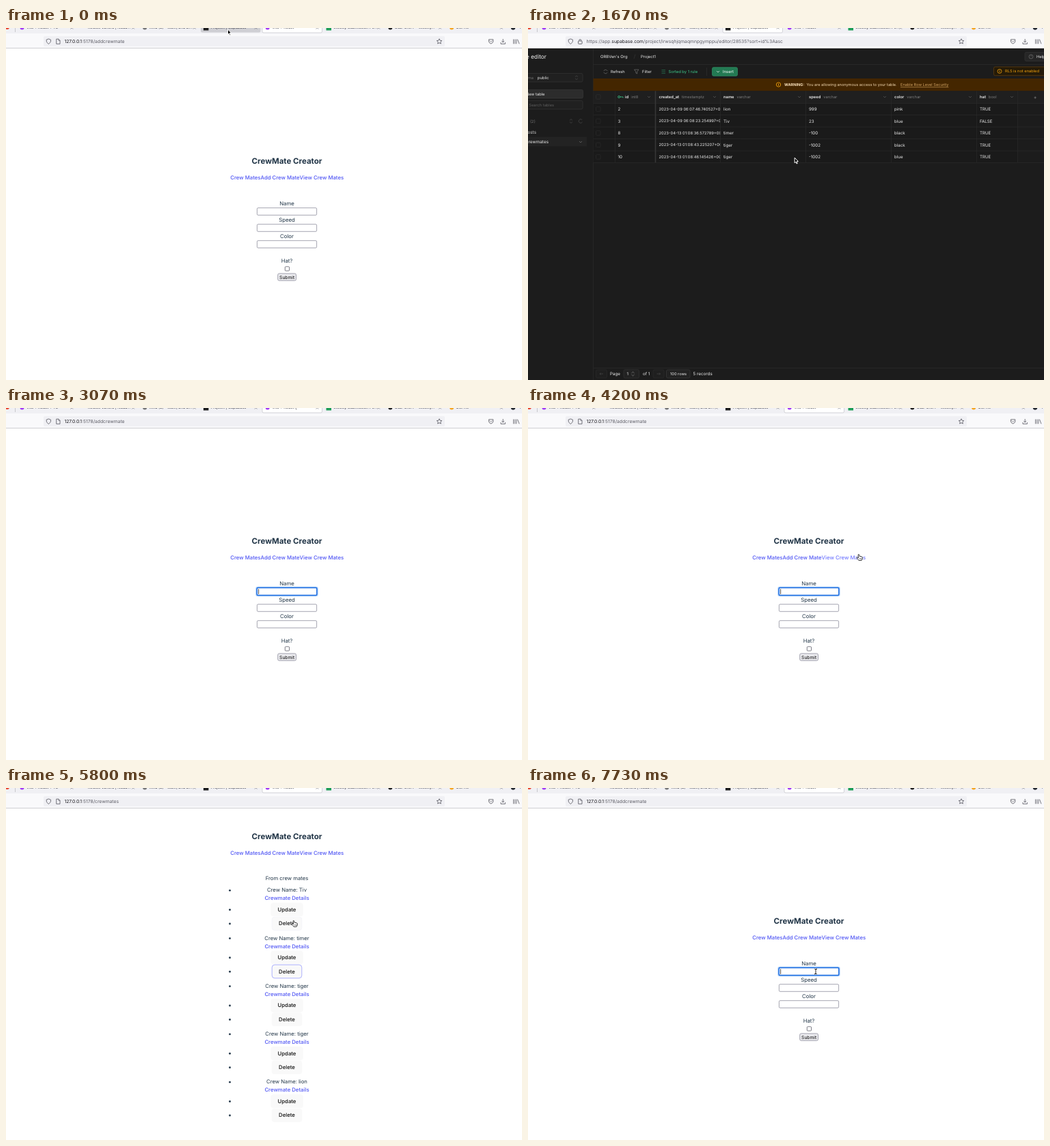
An HTML page with a canvas that plays this animation: 755 px wide and 516 px high, repeating every 8000 ms.

```html
<!DOCTYPE html>
<html lang="en">
<head>
<meta charset="utf-8">
<title>Crew form</title>
<style>
html, body { margin: 0; width: 755px; height: 516px; overflow: hidden; background: #fff; }
canvas { display: block; }
</style>
</head>
<body>
<canvas id="stage" width="755" height="516"></canvas>
<script>
const g = document.getElementById('stage').getContext('2d');
const LOOP = 8000;
const INK = '#213547', LINK = '#5056f4', LINK_HOVER = '#747bff';

// ---- drawing helpers ----
function text(s, x, y, size, color, weight = 400, align = 'left') {
  g.font = `${weight} ${size}px Inter, sans-serif`;
  g.fillStyle = color;
  g.textAlign = align;
  g.fillText(s, x, y + size * 0.36);
  return x + g.measureText(s).width;
}
function rect(x, y, w, h, fill) {
  g.fillStyle = fill;
  g.fillRect(x, y, w, h);
}
function box(x, y, w, h, r, fill, stroke, lw = 1) {
  g.beginPath();
  g.roundRect(x, y, w, h, r);
  if (fill) { g.fillStyle = fill; g.fill(); }
  if (stroke) { g.strokeStyle = stroke; g.lineWidth = lw; g.stroke(); }
}
function dot(x, y, r, fill) {
  g.beginPath();
  g.arc(x, y, r, 0, 7);
  g.fillStyle = fill;
  g.fill();
}
function line(points, color, lw = 0.8, fill) {
  g.beginPath();
  for (let i = 0; i < points.length; i += 2) g.lineTo(points[i], points[i + 1]);
  if (fill) { g.closePath(); g.fillStyle = fill; g.fill(); }
  g.strokeStyle = color;
  g.lineWidth = lw;
  g.stroke();
}
function ring(x, y, r, color, lw = 0.8, from = 0, to = 7) {
  g.beginPath();
  g.arc(x, y, r, from, to);
  g.strokeStyle = color;
  g.lineWidth = lw;
  g.stroke();
}
const chevron = (x, y, c, d = 1) => line([x - 2, y - d, x, y + d, x + 2, y - d], c, 0.7);
const sorter = (x, y, c) => { chevron(x, y - 2, c, -0.9); chevron(x, y + 2, c, 0.9); };
const clamp = v => Math.max(0, Math.min(1, v));

// ---- browser frame ----
const TABS = ['Vite + React + TS', 'Routes Vanora | Nudd…', 'Kind (2) - Main, and Br…', 'Project1 | Supabase',
  'Vite + React', 'Weekly Submission Po…', 'Cuz: Unit 7 - Weekly…', 'Get Hit'];
const TAB_ICONS = ['#a33cf5', '', '#777', '#1c1c1c', '#a33cf5', '#1e9e57', '#222', '#f5a623'];

function drawBrowser(url, active, hover) {
  rect(0, 0, 755, 9, '#f0f0f4');
  rect(0, 8, 755, 22, '#f9f9fb');
  rect(0, 29, 755, 1, '#cfcfd3');
  dot(2, -1, 3, '#e8442e');
  rect(13, 0, 0.7, 6, '#b5b5bb');
  if (hover >= 0) box(285 + (hover - 3) * 90, -6, 87.5, 12.5, 2, '#cfcfd4');
  box(285 + (active - 3) * 90, -6, 87.5, 13, 2, '#fff', '#c4c4ca', 0.7);
  TABS.forEach((name, i) => {
    const x = 20 + i * 89.8;
    const color = TAB_ICONS[i];
    if (i === 3 || i === 5) rect(x - 0.5, -4, 7.5, 7.5, color);
    else if (color) dot(x + 3.5, -0.5, 3, color);
    text(name, x + 10, -0.6, 5.6, '#33333b');
    line([x + 74.5, -2, x + 78, 1.5], '#55555d', 0.6);
    line([x + 74.5, 1.5, x + 78, -2], '#55555d', 0.6);
  });
  dot(742, -0.5, 3.2, '#24292f');
  text('r', 752, -0.6, 5.6, '#33333b');

  box(55, 12, 587, 15, 2, '#f0f0f4');
  const c = '#55555d';
  line([62.3, 16, 65.5, 17.2, 65.2, 20.5, 62.3, 23.6, 59.4, 20.5, 59.1, 17.2, 62.3, 16], c);
  if (active === 3) {
    box(73.5, 19, 5.6, 4.3, 0.8, null, c, 0.9);
    ring(76.3, 18.5, 1.7, c, 0.9, Math.PI, 0);
  } else {
    line([73.7, 16.2, 77, 16.2, 79, 18.2, 79, 23.3, 73.7, 23.3, 73.7, 16.2], c);
    line([76.8, 16.2, 76.8, 18.4, 79, 18.4], c, 0.6);
  }
  let x = 85.5;
  url.forEach((part, i) => x = text(part, x, 19.8, 6.74, i === 1 ? '#15141a' : '#5b5b64'));

  const star = [];
  for (let i = 0; i <= 10; i++) {
    const a = i * Math.PI / 5 - Math.PI / 2, r = i % 2 ? 1.9 : 4;
    star.push(634 + r * Math.cos(a), 19.8 + r * Math.sin(a));
  }
  line(star, c);
  line([706.5, 16.8, 712.8, 16.8, 712.8, 20, 711.5, 22, 709.6, 23, 707.7, 22, 706.5, 20, 706.5, 16.8], c);
  chevron(709.6, 19.4, c);
  line([727.2, 16, 727.2, 21], c);
  chevron(727.2, 20, c, 1.2);
  line([724, 21, 724, 23.3, 730.4, 23.3, 730.4, 21], c);
  for (const bx of [742.5, 744.7, 746.9]) line([bx, 16.5, bx, 23.3], c);
  line([748.5, 16.7, 751, 23.3], c);
}

// ---- light pages ----
function drawHeading(y, hoverLink) {
  text('CrewMate Creator', 411, y, 11.5, INK, 700, 'center');
  const names = ['Crew Mates', 'Add Crew Mate', 'View Crew Mates'];
  g.font = '500 7.75px Inter, sans-serif';
  let x = 411 - g.measureText(names.join('')).width / 2;
  names.forEach((s, i) => x = text(s, x, y + 24.6, 7.75, i === hoverLink ? LINK_HOVER : LINK, 500));
}

function drawForm(focusedAt, t, hoverLink) {
  drawHeading(195, hoverLink);
  ['Name', 'Speed', 'Color', 'Hat?'].forEach((s, i) =>
    text(s, 411, [256.8, 280.8, 304.8, 340.8][i], 7.8, INK, 400, 'center'));
  for (const y of [263.7, 287.7, 311.7]) box(367.4, y, 87.2, 10.6, 1.5, '#fff', '#8f8f9d', 0.8);
  if (t >= focusedAt) {
    box(366, 262.4, 90, 13.2, 2.5, null, '#a9cdf8', 1.4);
    box(367.2, 263.5, 87.6, 11, 1.5, '#fff', '#1a6be0', 1.5);
    if ((t - focusedAt) % 1000 < 500) rect(369.3, 265.3, 0.8, 7.6, '#222');
  }
  box(408.3, 349.8, 6.2, 6.2, 1, '#fff', '#6f6f7a', 0.9);
  box(397.7, 359.9, 26.8, 10.4, 2, '#e9e9ed', '#8f8f9d', 0.8);
  text('Submit', 411.1, 365.2, 6.7, '#000', 400, 'center');
}

const fade = (t, on, off) => clamp((t - on) / 250) - clamp((t - off) / 250);

function drawButton(label, y, half, glow) {
  box(411 - half, y - 10, half * 2, 20, 4, '#f9f9f9');
  if (glow > 0) box(411 - half + 0.4, y - 9.8, half * 2 - 0.8, 19.6, 4, null, `rgba(100,108,255,${glow})`, 0.8);
  text(label, 411, y, 7.75, '#111', 500, 'center');
}

function drawList(t, hoverLink) {
  const loaded = t >= 4670;
  const top = loaded ? 71 : 247;
  drawHeading(top, hoverLink);
  text('From crew mates', 411, top + 61.7, 7.7, INK, 400, 'center');
  if (!loaded) return;
  ['Tiv', 'timer', 'tiger', 'tiger', 'lion'].forEach((name, i) => {
    const y = 149.7 + i * 70.25;
    text('Crew Name: ' + name, 411, y, 7.7, INK, 400, 'center');
    text('Crewmate Details', 411, y + 12, 7.75, LINK, 500, 'center');
    drawButton('Update', y + 28.5, 23.7, 0);
    const glow = i === 0 ? fade(t, 5790, 5920) : i === 1 ? fade(t, 4950, 5710) : 0;
    drawButton('Delete', y + 49, 22.2, glow);
    for (const dy of [0.5, 28.8, 49.3]) dot(327.5, y + dy, 1.4, INK);
  });
  if (t >= 6250) {
    box(-3, 504, 108, 14, 2, '#f0f0f4', '#c4c4ca', 0.7);
    text('127.0.0.1:5178/addcrewmate', 3, 510, 6.2, '#33333b');
  }
}

// ---- database page ----
const COLUMNS = [[142, 'id', 'int8', 177], [191.5, 'created_at', 'timestamptz', 273], [286, 'name', 'varchar', 397],
  [411, 'speed', 'varchar', 522], [536, 'color', 'varchar', 647], [661, 'hat', 'bool', 708]];
const ROWS = ['2|2023-04-09 06:07:46.740527+00|lion|999|pink|TRUE',
  '3|2023-04-09 06:08:23.254997+00|Tiv|23|blue|FALSE',
  '8|2023-04-13 01:08:36.572789+00|timer|-100|black|TRUE',
  '9|2023-04-13 01:08:43.225207+00|tiger|-1002|black|TRUE',
  '10|2023-04-13 01:08:46.145426+00|tiger|-1002|blue|TRUE'];

function drawDatabase() {
  const W = '#ededed', DIM = '#707070', FAINT = '#4a4a4a', EDGE = '#2a2a2a', GREEN = '#3ecf8e', AMBER = '#f1a10d', BG = '#1c1c1c';
  rect(0, 30, 755, 486, BG);

  // sidebar
  text('Table editor', 27, 42, 8.4, W, 400, 'right');
  box(-5, 66.5, 85, 12.5, 2, '#202020', '#343434', 0.7);
  text('schema', 8, 72.8, 5.7, DIM, 400, 'right');
  text('public', 14, 72.8, 5.8, W);
  sorter(71, 72.8, FAINT);
  box(-5, 90.5, 85.5, 12.5, 2, '#2c2c2c', '#383838', 0.7);
  text('New table', 24.5, 97, 5.8, W, 400, 'right');
  box(-5, 106.5, 85, 12.5, 2, '#202020', '#343434', 0.7);
  text('Search tables', 38, 112.8, 5.7, '#5c5c5c', 400, 'right');
  text('(2)', 3, 136.5, 5.8, DIM);
  sorter(63, 136.5, FAINT);
  ring(77, 136.5, 2.8, FAINT, 0.7, 0.5, 5.6);
  text('posts', 12, 153, 6.4, '#d0d0d0', 400, 'right');
  rect(0, 159.5, 86, 14, '#232323');
  text('crewmates', 30, 167, 6.4, W, 400, 'right');
  chevron(77, 167, DIM);
  rect(95, 30, 0.8, 486, EDGE);

  // top bar
  text("ORBVen's Org", 106, 41.8, 5.9, W);
  text('Project1', 165, 41.8, 5.9, W);
  line([155, 45, 157, 38.5], '#3a3a3a', 0.6);
  box(727, 35.5, 40, 13, 2, '#262626', '#343434', 0.7);
  ring(736, 42, 3, DIM, 0.7);
  text('?', 736, 42, 4, DIM, 400, 'center');
  text('Help', 744, 42, 5.8, W);
  rect(95, 53, 660, 0.8, EDGE);

  // toolbar
  ring(113.5, 64, 2.8, DIM, 0.7, 0.4, 2.8);
  ring(113.5, 64, 2.8, DIM, 0.7, 3.5, 5.9);
  text('Refresh', 121, 64, 5.7, W);
  line([155.5, 61, 162, 61, 159.7, 64, 159.7, 67, 157.8, 66, 157.8, 64, 155.5, 61], DIM, 0.7);
  text('Filter', 167, 64, 5.8, W);
  for (const y of [61.6, 64, 66.4]) line([195.5, y, 201, y], '#2a8a60', 0.6);
  text('Sorted by 1 rule', 205.5, 64, 5.8, GREEN);
  rect(261, 58, 0.7, 12, '#303030');
  box(269.5, 57.7, 37, 12.6, 2, '#237a53', '#2f9467', 0.7);
  chevron(278, 64, W);
  text('Insert', 285, 64, 5.9, '#fff');
  box(681.5, 57, 78, 12.7, 2, '#241a08', '#5f3c0c', 0.8);
  ring(690, 63.4, 3, AMBER);
  line([690, 61.8, 690, 65], AMBER, 0.7);
  text('RLS is not enabled', 698, 63.3, 5.7, AMBER);

  // warning
  rect(95.5, 74, 660, 18.3, '#442600');
  ring(366.5, 83, 3.2, AMBER, 0.9);
  line([366.5, 81.3, 366.5, 84.8], AMBER, 0.8);
  text('WARNING:', 375, 83, 5.6, '#fbe3bd', 700);
  text('You are allowing anonymous access to your table.', 407.5, 83, 5.6, '#f3d9b1');
  const end = text('Enable Row Level Security', 545, 83, 5.65, '#d4a564');
  rect(545, 86.5, end - 545, 0.6, '#d4a564');

  // grid
  rect(95.5, 92.3, 660, 18, '#1f1f1f');
  rect(95.5, 110, 621, 87.5, '#1a1a1a');
  box(99.5, 97.7, 6.5, 6.5, 1, null, '#303030', 0.7);
  ring(133.2, 101, 1.5, GREEN, 0.8);
  line([134.7, 101, 139, 101, 139, 102.5], GREEN, 0.8);
  for (const [x, name, type, arrow] of COLUMNS) {
    const next = text(name, x, 101, 5.8, W, 600);
    text(type, next + 4, 101, 5.65, '#7e7e7e');
    chevron(arrow, 101, '#5c5c5c');
  }
  text('+', 742, 101, 7, '#999', 400, 'center');
  ROWS.forEach((row, i) => {
    const y = 118.9 + i * 17.5;
    const cells = row.split('|');
    text(cells[1], 191.5, y, 5.8, W);
    rect(281.5, y - 8, 30, 16, '#1a1a1a');
    cells.forEach((s, k) => { if (k !== 1) text(s, k ? COLUMNS[k][0] : 131.5, y, 6.2, W); });
    box(99.5, y - 3.2, 6.5, 6.5, 1, null, '#2c2c2c', 0.7);
    rect(95.5, y + 8.3, 660, 0.7, EDGE);
  });
  rect(95.5, 110, 660, 0.7, EDGE);
  for (const x of [127, 281.3, 406.3, 531.3, 656.3, 716.3]) rect(x, 92.3, 0.7, 105, EDGE);
  rect(185.7, 92.3, 1.6, 105, '#363636');

  // footer
  rect(95.5, 498, 660, 0.8, EDGE);
  for (const [x, d] of [[107.5, -1], [191, 1]]) {
    box(x - 8, 501, 16, 12, 2, '#1f1f1f', '#2c2c2c', 0.7);
    line([x - 2.5, 507, x + 2.5, 507], FAINT, 0.7);
    line([x + d, 505.5, x + d * 2.5, 507, x + d, 508.5], FAINT, 0.7);
  }
  text('Page', 120, 507, 6.2, W);
  box(140, 500.8, 22.5, 12.4, 2, '#222', '#343434', 0.7);
  text('1', 144.5, 507, 6, W);
  sorter(153.5, 507, '#888');
  text('of 1', 168, 507, 6.2, W);
  box(202.5, 501, 34.5, 12, 2, '#222', '#3a3a3a', 0.7);
  text('100 rows', 208, 507, 5.7, W);
  text('5 records', 241.5, 507, 6.3, W);
}

// ---- pointer: time, x, y ----
const PATH = [[400, 324.5, 2], [900, 352, 110], [1200, 364, 160], [1620, 392, 192], [2070, 340, 140], [2250, 340, 140],
  [2700, 405, 62], [3000, 421.5, -6], [3270, 421.5, -6], [3650, 428, 276], [3800, 440, 272], [4070, 484, 214.5],
  [4700, 484, 214.5], [5100, 422, 264], [5560, 422, 264], [5790, 421, 194.5], [5900, 421, 190], [6200, 406, 93.5],
  [6520, 406, 93.5], [7100, 421, 269]];

function pointerAt(t) {
  const i = PATH.findIndex(p => p[0] > t);
  if (i === 0) return PATH[0].slice(1);
  if (i < 0) return PATH.at(-1).slice(1);
  const [a, x, y] = PATH[i - 1], [b, u, v] = PATH[i];
  const k = (t - a) / (b - a), e = k * k * (3 - 2 * k);
  return [x + (u - x) * e, y + (v - y) * e];
}

function drawPointer(x, y, kind) {
  g.save();
  g.translate(x, y);
  g.lineJoin = 'round';
  if (kind === 'beam') {
    const shape = [-1.8, -3.8, 0, -3.2, 1.8, -3.8, 0, -3.2, 0, 3.2, -1.8, 3.8, 0, 3.2, 1.8, 3.8];
    line(shape, '#fff', 2);
    line(shape, '#111', 0.9);
  } else if (kind === 'hand') {
    line([-1, 0.5, 0, 0, 0.8, 0.7, 1.2, 3, 3, 3.1, 4.8, 3.7, 5.4, 4.6, 5, 7.3, 4, 9, 0, 9, -1.4, 7,
      -3, 5, -2.4, 4.2, -0.5, 5.2], '#111', 0.8, '#fff');
    for (const fx of [1.2, 2.7, 4]) line([fx, 5.6, fx, 7.6], '#111', 0.5);
  } else {
    line([0, 0, 0, 7.6, 1.7, 6.1, 2.9, 8.8, 4.1, 8.3, 2.9, 5.6, 5.2, 5.4], '#fff', 1, '#000');
  }
  g.restore();
}

// ---- timeline ----
function draw(t) {
  const page = t < 400 ? 'form' : t < 3070 ? 'data' : t < 4400 ? 'form' : t < 6520 ? 'list' : 'form';
  const [x, y] = pointerAt(t);
  const linkY = page === 'form' ? 219.6 : t < 4670 ? 271.6 : 95.6;
  const overLinks = page !== 'data' && Math.abs(y + 3 - linkY) < 6 && x > 328 && x < 494;
  const hoverLink = overLinks ? (x < 373 ? 0 : x < 430 ? 1 : 2) : -1;
  let kind = 'arrow';
  if (overLinks) kind = 'hand';
  else if (page === 'form' && x > 367 && x < 455 && [269, 293, 317].some(f => Math.abs(y - f) < 6)) kind = 'beam';
  else if (page === 'list' && t >= 4670 && Math.abs(x - 411) < 23 && y > 143) kind = 'hand';

  rect(0, 0, 755, 516, '#fff');
  if (page === 'data') drawDatabase();
  else if (page === 'list') drawList(t, hoverLink);
  else drawForm(t < 400 ? Infinity : t < 4400 ? 3070 : 7330, t, hoverLink);

  const hoverTab = t < 400 ? 3 : t >= 2930 && t < 3070 ? 4 : -1;
  if (page === 'data') drawBrowser(['https://app.', 'supabase.com', '/project/irwsqhjqmaqmnpgymppu/editor/28535?sort=id%3Aasc'], 3, hoverTab);
  else drawBrowser(['', '127.0.0.1', page === 'list' ? ':5178/crewmates' : ':5178/addcrewmate'], 4, hoverTab);
  drawPointer(x, y, kind);
}

g.textRendering = 'geometricPrecision';
const start = performance.now();
function tick() {
  draw((performance.now() - start) % LOOP);
  requestAnimationFrame(tick);
}
tick();
</script>
</body>
</html>
```
